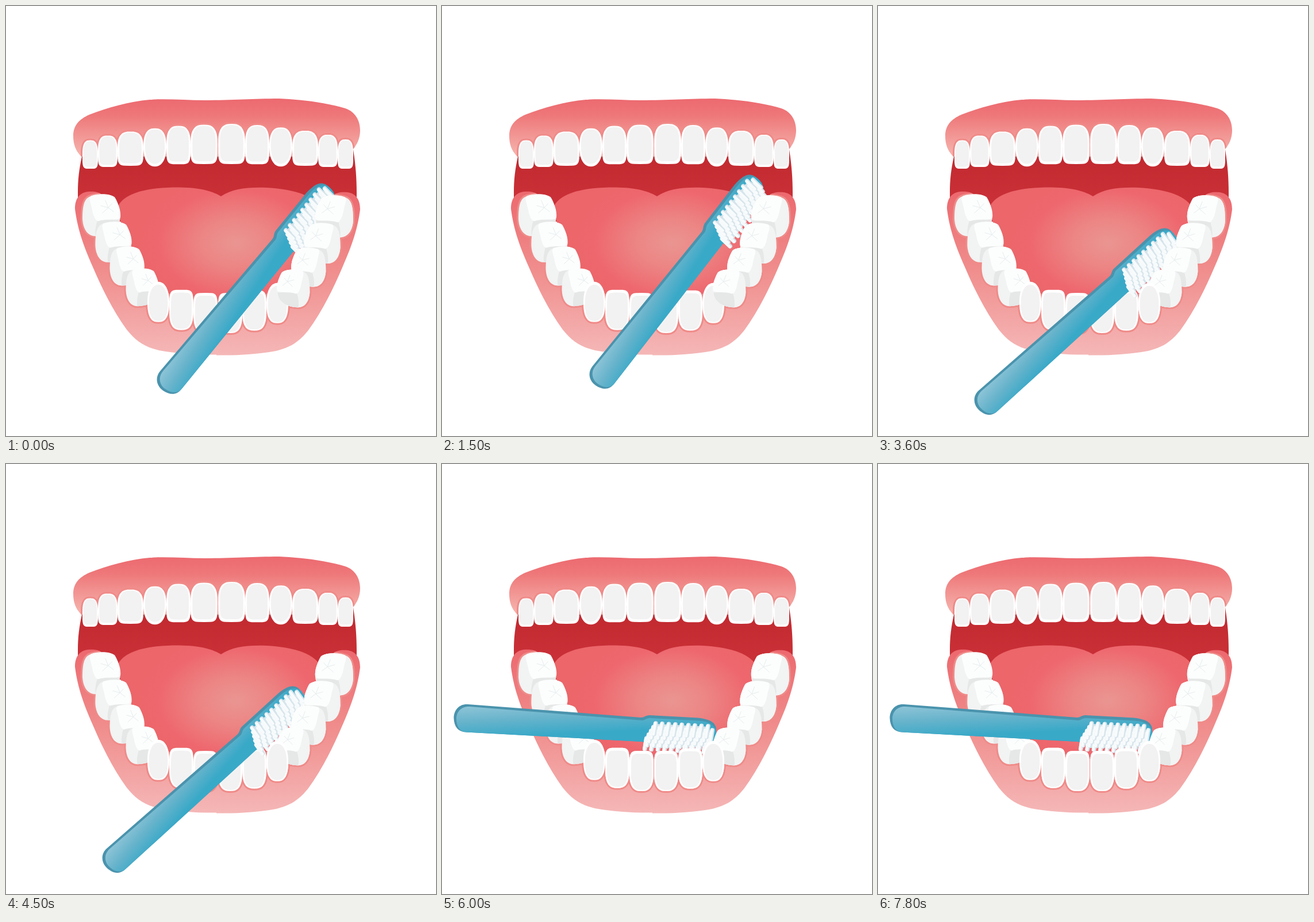
An HTML page that plays this animation: 748x748 px, repeating every 8.1 s.

```html
<!DOCTYPE html>
<html lang="en">
<head>
<meta charset="utf-8">
<title>Brushing teeth</title>
<style>
html, body { margin: 0; width: 100%; height: 100%; overflow: hidden; background: #fff; }
svg { display: block; width: 100vw; height: 100vh; }
.tooth path { vector-effect: non-scaling-stroke; }
.halo path { fill: none; stroke: #ef8b89; stroke-width: 6; vector-effect: non-scaling-stroke; }
</style>
</head>
<body>
<svg viewBox="0 0 748 748">
  <defs>
    <linearGradient id="upperFill" x1="0" y1="162" x2="0" y2="255" gradientUnits="userSpaceOnUse">
      <stop offset="0" stop-color="#ec6a70"/><stop offset=".3" stop-color="#ee7779"/><stop offset="1" stop-color="#f5b0aa"/>
    </linearGradient>
    <linearGradient id="lowerFill" x1="0" y1="322" x2="0" y2="608" gradientUnits="userSpaceOnUse">
      <stop offset="0" stop-color="#ec686e"/><stop offset=".5" stop-color="#f08f8e"/><stop offset="1" stop-color="#f5b7b7"/>
    </linearGradient>
    <linearGradient id="mouthFill" x1="0" y1="250" x2="0" y2="340" gradientUnits="userSpaceOnUse">
      <stop offset="0" stop-color="#c0292f"/><stop offset="1" stop-color="#ca3037"/>
    </linearGradient>
    <radialGradient id="tongueFill" cx="400" cy="412" r="170" gradientUnits="userSpaceOnUse" gradientTransform="translate(0 132) scale(1 .68)">
      <stop offset="0" stop-color="#ea9591"/><stop offset=".35" stop-color="#ec8685"/><stop offset=".8" stop-color="#ee676e"/><stop offset="1" stop-color="#ec666a"/>
    </radialGradient>
    <linearGradient id="handleFill" x1="40" y1="420" x2="43" y2="478" gradientUnits="userSpaceOnUse">
      <stop offset="0" stop-color="#90c5d8"/><stop offset=".5" stop-color="#66b3cb"/><stop offset="1" stop-color="#39a9c8"/>
    </linearGradient>
    <path id="upperGum" d="M131 262C121 252 117 240 117 226C117 208 127 197 145 189C177 177 213 166 250 163C282 161 312 164 345 164C395 164 430 161 475 161C520 163 560 169 590 178C608 184 616 200 616 216C616 230 611 241 603 250L600 262Z"/>
    <path id="gumHalf" d="M366 514L440 510L495 472L528 410L550 352L568 330C575 324 584 323 594 324C609 326 616 337 616 354C612 385 604 412 585 455C567 497 549 532 526 564C510 584 495 594 470 600C435 606 405 608 366 607.500Z"/>
    <clipPath id="upperClip"><use href="#upperGum"/></clipPath>
    <clipPath id="lowerClip">
      <use href="#gumHalf"/><use href="#gumHalf" transform="matrix(-1 0 0 1 736 -1)"/>
    </clipPath>
  </defs>
  <path fill="url(#mouthFill)" d="M132 250L132 262C127 285 125 302 125 325V375H610V325C610 298 608 275 604 250Z"/>
  <path fill="url(#tongueFill)" d="M194 350C203 330 232 317 290 315.500C328 315 354 319 374 331C394 318 418 315 453 316C505 319 537 331 547 352L545 420L500 500L430 530H300L220 470Z"/>
  <use href="#upperGum" fill="url(#upperFill)"/>
  <g fill="url(#lowerFill)">
    <use href="#gumHalf"/><use href="#gumHalf" transform="matrix(-1 0 0 1 736 -1)"/>
  </g>
  <g id="upperHalo" class="halo" clip-path="url(#upperClip)"></g>
  <g id="lowerHalo" class="halo" clip-path="url(#lowerClip)"></g>
  <g id="back" class="tooth"></g>
  <g id="brush">
    <path fill="#4a93ad" d="M45 418C30 417 20.500 428 20.500 442C21 457 28 466 42 466.500L347 483L366 487L455 490C470 490 477 480 477 460C475 449 466 444 445 441.500L361 437C354 437 352 441 346 441Z"/>
    <path fill="url(#handleFill)" d="M48 422C34 421 25 431 25 443C25 456 31 466 42 466.500L347 483C354 483 358 486 366 487L455 490C470 490 477 480 477 464C472 451 462 448 445 446.500L362 442C355 442 353 446 348 446Z"/>
    <path fill="#d3e5ed" d="M370 452L465 457L468 480L455 492L366 494L356 484Z"/>
    <g id="bristles" stroke-linecap="round"></g>
  </g>
  <g id="front" class="tooth"></g>
</svg>
<script>
const $ = id => document.getElementById(id);
const range = n => [...Array(n).keys()];

// Molar parts in a unit box
const MOLAR = 'M.18 .06C.02 .12 0 .35 0 .6C.02 .85 .15 1 .35 1C.65 1 .93 .9 .98 .65C1.03 .5 .95 .2 .85 .07C.7 -.03 .35 0 .18 .06Z';
const SIDE = 'M.4 .61C.6 .57 .85 .62 .98 .6C.97 .85 .7 1 .35 1C.32 .87 .36 .72 .4 .61Z';
const TOP = 'M.22 .04C.4 -.02 .7 -.02 .82 .06C.95 .2 1.02 .4 1 .55C.96 .64 .6 .57 .42 .64C.34 .64 .28 .5 .25 .35C.22 .2 .15 .1 .22 .04Z';
const CREASE = 'M.48 .27L.68 .32L.78 .22M.68 .32L.6 .14M.68 .32L.83 .42M.68 .32L.52 .45';

// Superellipse in a unit box with its own roundness for root and biting edge
function outline(root, bite) {
  const bend = (v, n) => Math.sign(v) * Math.abs(v) ** (2 / n) / 2 + .5;
  return 'M' + range(48).map(i => {
    const a = i * Math.PI / 24, n = Math.sin(a) < 0 ? root : bite;
    return [bend(Math.cos(a), n), bend(Math.sin(a), n)].map(v => v.toFixed(3)).join(' ');
  }).join('L') + 'Z';
}
const INCISOR = outline(2.8, 5), CANINE = outline(2.6, 2.2);

const path = (d, fill, more = '') => `<path d="${d}" fill="${fill}" ${more}/>`;
const faces = d => path(d, '#fff') + path(d, '#f2f2f2', 'transform="translate(.07 .03) scale(.86 .9)"');
const molarFaces = path(MOLAR, '#f2f3f3') + path(SIDE, '#e6e7e7') + path(TOP, '#fcfefe') +
  path(CREASE, 'none', 'stroke="#e8ecec"');

// A tooth in the box x, y, w, h; negative sizes flip it
function tooth(x, y, w, h, d) {
  const wrap = body => `<g transform="translate(${x} ${y}) scale(${w} ${h})">${body}</g>`;
  return { shape: wrap(d === MOLAR ? molarFaces : faces(d)), halo: wrap(path(d, 'none')) };
}

// Each rule gives the right half; side -1 mirrors it
const AXIS = 368.5;
const across = (x, side) => AXIS + (x - AXIS) * side;
const upperEdges = [369, 416, 458, 498, 543, 577, 604];

function upperTooth(i, side) {
  const k = i / 5, canine = i === 2;
  const x = upperEdges[i], w = upperEdges[i + 1] - x;
  const top = 205 + 27 * k ** 1.6 + (side < 0 ? 1.5 : 0);
  const bottom = 275 + 8 * k * k + (canine ? 3 : 0);
  return tooth(across(x, side), top, w * side, bottom - top, canine ? CANINE : INCISOR);
}

function frontTooth(i, side) {
  const bottom = 569 - 4.3 * i * i - (side < 0 ? i : 0);
  return tooth(across(369 + 42 * i, side), bottom, (i === 2 ? 38 : 42) * side, -70, i === 2 ? CANINE : INCISOR);
}

function molar(j, side) {
  const w = 66 - 3 * j, h = 73 - 2.5 * j;
  const x = 571 - 19.5 * j - 1.4 * j * j + w / 2;
  const y = 366 + 49 * j - 2.4 * j * j - h / 2 - (side < 0 ? 2 : 0);
  return tooth(across(x, side), y, -w * side, h, MOLAR);
}

const half = side => [...range(4).map(j => molar(j, side)), ...[2, 1, 0].map(i => frontTooth(i, side))];
const upper = [-1, 1].flatMap(side => range(6).map(i => upperTooth(i, side)));
const left = half(-1), right = half(1);
const lower = [...left, ...right];

const join = (list, key) => list.map(t => t[key]).join('');
$('upperHalo').innerHTML = join(upper, 'halo');
$('lowerHalo').innerHTML = join(lower, 'halo');
$('back').innerHTML = join([...upper, ...lower], 'shape');
$('front').innerHTML = join([...right, ...left.slice(5).reverse()], 'shape');

// Staggered bristles, the row nearest the handle's edge on top
$('bristles').innerHTML = range(5).reverse().map(r =>
  range(r ? 10 : 9).map(i => {
    const x = 371 - 4 * r + 11.4 * i, y = 451 + 6.5 * r + .6 * i;
    const line = (dx, color, w) =>
      `<path d="M${x + dx} ${y}l-3 19" stroke="${color}" stroke-width="${w}"/>`;
    return line(.8, '#d6e4eb', 7.5) + line(-.4, '#f8fbfc', 5.2);
  }).join('')).join('');

// Low and high pose per place: handle end x, y, angle; front = teeth before the brush
const spots = [
  { low: [287, 650, -54], high: [281, 641, -55.3], front: 4 },
  { low: [192, 686, -45.5], high: [186, 679, -46.2], front: 5 },
  { low: [48, 458, .2], high: [44, 442, 0], front: 9 }
];
const STEP = 300, PER_SPOT = 9, STROKE = 3;
const frontTeeth = [...$('front').children];

function draw(time) {
  const step = Math.floor(time / STEP) % (PER_SPOT * spots.length);
  const { low, high, front } = spots[Math.floor(step / PER_SPOT)];
  const k = step % STROKE / (STROKE - 1);
  const [x, y, a] = low.map((v, i) => v + (high[i] - v) * k);
  $('brush').setAttribute('transform', `translate(${x} ${y}) rotate(${a}) translate(-44 -442)`);
  frontTeeth.forEach((t, i) => t.style.display = i < front ? '' : 'none');
}

const start = performance.now();
function tick() {
  draw(performance.now() - start);
  requestAnimationFrame(tick);
}
tick();
</script>
</body>
</html>
```
